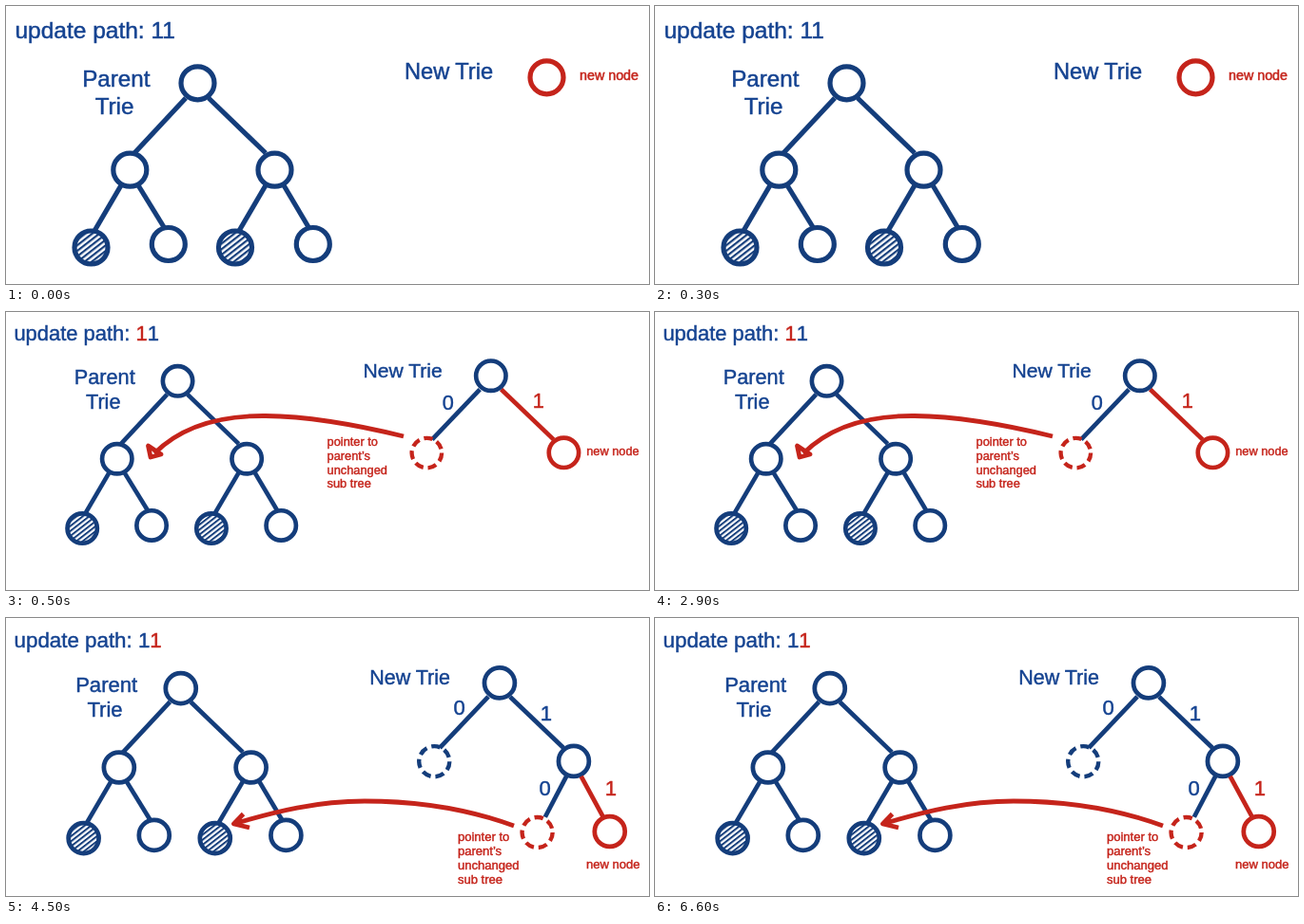
An HTML page for the animation above (8000 ms loop, 676x293 px).

```html
<!DOCTYPE html>
<html lang="en">
<head>
<meta charset="utf-8">
<title>Trie update</title>
<style>
  html, body { margin: 0; width: 100%; height: 100%; overflow: hidden; background: #fff; }
  svg { display: block; width: 676px; height: 293px; }
  text { font-family: "Liberation Sans", Arial, sans-serif; white-space: pre; }
</style>
</head>
<body>
<svg id="stage" viewBox="0 0 676 293">
  <defs>
    <pattern id="hatch" width="10" height="4.6" patternUnits="userSpaceOnUse" patternTransform="rotate(-38)">
      <rect width="10" height="4.6" fill="#fff"/>
      <rect width="10" height="2.2" fill="#143d7b"/>
    </pattern>
  </defs>
  <g id="scene"></g>
</svg>
<script>
const BLUE = '#143d7b', INK = '#154391', RED = '#c5241b';
const LOOP = 8000;
const scene = document.getElementById('scene');

const node = (x, y, color = BLUE, fill = '#fff') =>
  `<circle cx="${x}" cy="${y}" r="17.5" fill="${fill}" stroke="${color}" stroke-width="5.2"/>`;
const leaf = (x, y) => node(x, y, BLUE, 'url(#hatch)');
const dashed = (x, y, color) =>
  `<circle cx="${x}" cy="${y}" r="17.6" fill="none" stroke="${color}" stroke-width="4.8" stroke-dasharray="10.3 5.5"/>`;
const edge = (x1, y1, x2, y2, color = BLUE) =>
  `<path d="M${x1} ${y1}L${x2} ${y2}" stroke="${color}" stroke-width="5.2"/>`;
const label = (x, y, str, color = INK, size = 24.2) =>
  `<text x="${x}" y="${y}" font-size="${size}" fill="${color}" stroke="${color}" stroke-width=".5">${str}</text>`;
const note = (x, y, ...lines) =>
  lines.map((line, i) => label(x, y + i * 16.5, line, RED, 14.3)).join('');
const pointerNote = (x, y) => note(x, y, 'pointer to', 'parent’s', 'unchanged', 'sub tree');
const digit = (str, color) => `<tspan fill="${color}" stroke="${color}">${str}</tspan>`;

// Heading and parent trie, shared by every step
const parent = (first, second) =>
  label(9.4, 34, 'update path: ' + digit(1, first) + digit(1, second), INK, 24.5) +
  label(80.2, 85, 'Parent') + label(93.7, 114, 'Trie') + label(419, 77, 'New Trie', INK, 23.6) +
  edge(189, 97, 135, 155) + edge(213, 97, 273, 155) +
  edge(121, 189, 93, 237) + edge(139, 189, 166, 233) +
  edge(273, 189, 245, 237) + edge(292, 189, 318, 233) +
  node(201.5, 81.3) + node(130.3, 172.7) + node(282.5, 172.7) +
  leaf(89.5, 254.5) + node(170.8, 251) + leaf(241, 254.5) + node(322.8, 251);

const branches = (color, left, right) =>
  edge(556, 91, 500, 150) + edge(581, 91, 642.5, 150, color) +
  node(569, 75) + dashed(493.7, 165.8, left) + node(654.5, 165.5, right);

const steps = [
  { at: 0, scale: 1, draw: () =>
      parent(INK, INK) + node(568.5, 75.3, RED) + note(603, 78, 'new node') },
  { at: 500, scale: .896, draw: () =>
      parent(RED, INK) + branches(RED, RED, RED) +
      label(512, 115.5, '0') + label(618, 112.5, '1', RED) +
      note(681, 168, 'new node') + pointerNote(376.8, 157.5),
    arrow: 'M418 131C365 118 315 110 273 109.500C225 109 185 120 156 149',
    head: 'M149.500 141L152 153L163 150Z' },
  { at: 4500, scale: .912, draw: () =>
      parent(INK, RED) + branches(BLUE, BLUE, BLUE) +
      edge(646, 183, 621.5, 230) + edge(663, 183, 688.5, 230, RED) +
      dashed(612.5, 247.8, RED) + node(696, 246.7, RED) +
      label(516, 111.5, '0') + label(616, 118.5, '1') +
      label(614.5, 205.5, '0') + label(690.5, 205, '1', RED) +
      note(668.8, 289.5, 'new node') + pointerNote(520.8, 258),
    arrow: 'M534 219C482 200 427 193 377 193C327 193 283 204 241 216.500',
    head: 'M249.500 206.500L239.500 217L256 221' }
];

function render({ scale, draw, arrow, head }) {
  let out = `<g transform="scale(${scale})">${draw()}</g>`;
  if (arrow) {
    out += `<path d="${arrow}${head}" fill="none" stroke="${RED}" stroke-width="4.8" stroke-linejoin="round"/>`;
  }
  scene.innerHTML = out;
}

let shown;
const start = performance.now();
function tick() {
  const t = (performance.now() - start) % LOOP;
  const step = steps.filter(s => s.at <= t).pop();
  if (step !== shown) render(shown = step);
  requestAnimationFrame(tick);
}
tick();
</script>
</body>
</html>
```
